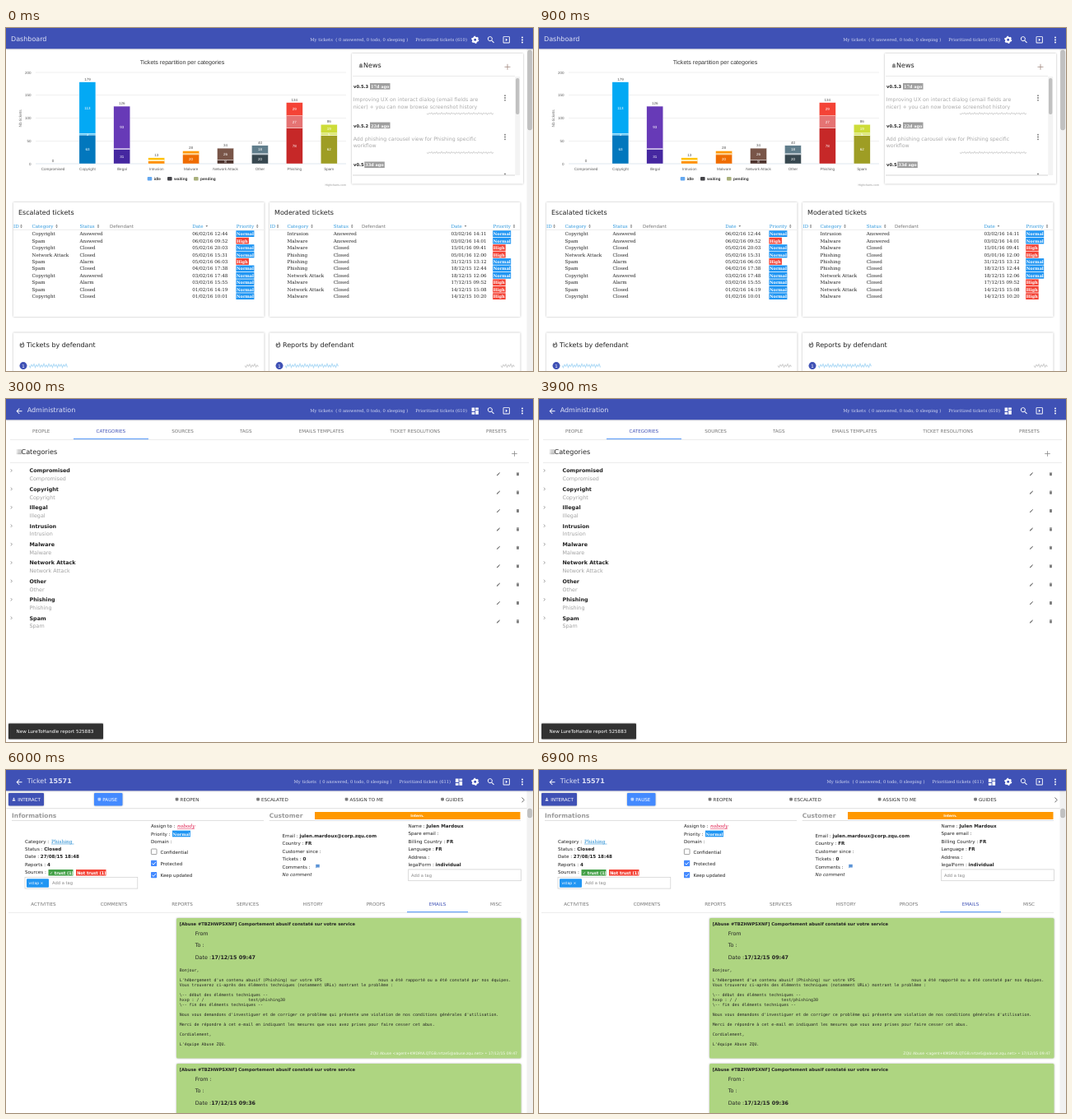
These frames come from a looping animation (640 px wide and 417 px high, 7500 ms). An HTML page:

```html
<!DOCTYPE html>
<html lang="en">
<head>
<meta charset="utf-8">
<title>Ticket console tour</title>
<style>
html, body { margin: 0; height: 100%; overflow: hidden; background: #fff; }
svg { display: block; width: 100%; height: 100%; }
text { font-family: "DejaVu Sans", sans-serif; white-space: pre; text-rendering: geometricPrecision; }
.serif { font-family: "DejaVu Serif", "Noto Serif", serif; }
.arial { font-family: "Liberation Sans", Arial, sans-serif; }
.mono { font-family: "DejaVu Sans Mono", monospace; }
.b { font-weight: bold; }
.i { font-style: italic; }
.mid { text-anchor: middle; }
.end { text-anchor: end; }
.card { filter: drop-shadow(0 .7px .8px rgba(0,0,0,.3)); }
</style>
</head>
<body>
<svg id="stage" viewBox="0 0 640 417"></svg>
<script>
const INDIGO = '#3f51b5', BLUE = '#2196f3', RED = '#f44336', GREY = '#9e9e9e', PALE = '#bdbdbd', INK = '#222', RULE = '#e0e0e0';

// Drawing helpers, each returning SVG markup
const text = (x, y, s, size = 5.6, fill = INK, cls = '') =>
  `<text x="${x}" y="${y}" font-size="${size}" fill="${fill}" class="${cls}">${s}</text>`;
const bold = s => `<tspan class="b">${s}</tspan>`;
const rect = (x, y, w, h, fill, more = '') =>
  `<rect x="${x}" y="${y}" width="${w}" height="${h}" fill="${fill}" ${more}/>`;
const line = (x1, y, x2, c = RULE, w = .6) => rect(x1, y - w / 2, x2 - x1, w, c);
const disc = (x, y, r, fill, more = '') => `<circle cx="${x}" cy="${y}" r="${r}" fill="${fill}" ${more}/>`;
const stroke = (d, c, w = .8) => `<path d="${d}" fill="none" stroke="${c}" stroke-width="${w}"/>`;
const card = (x, y, w, h) => rect(x, y, w, h, '#fff', 'class="card"');
const each = (list, f) => list.map(f).join('');
const plus = (x, y, r, c) => stroke(`M${x - r} ${y}h${2 * r}M${x} ${y - r}v${2 * r}`, c);
const dots = (x, y, gap, r, c) => each([-1, 0, 1], k => disc(x, y + k * gap, r, c));
const down = (x, y, c = '#888', r = 2.6) => `<path d="M${x - r} ${y - r / 2}h${2 * r}l${-r} ${r}z" fill="${c}"/>`;
const sorter = (x, y, c) => `<path d="M${x - 1.3} ${y - .6}h2.6l-1.3-1.7zM${x - 1.3} ${y + .6}h2.6l-1.3 1.7z" fill="${c}"/>`;

const shapes = {
  board: 'M3 13h8V3H3v10zm0 8h8v-6H3v6zm10 0h8V11h-8v10zm0-18v6h8V3h-8z',
  search: 'M15.5 14h-.8l-.3-.3A6.5 6.5 0 1 0 13.7 14.4l.3.3v.8l5 5L20.5 19zm-6 0a4.5 4.5 0 1 1 0-9 4.5 4.5 0 0 1 0 9z',
  play: 'M10 8v8l5-4zM19 3H5a2 2 0 0 0-2 2v14a2 2 0 0 0 2 2h14a2 2 0 0 0 2-2V5a2 2 0 0 0-2-2zm0 16H5V5h14z',
  back: 'M20 11H7.8l5.6-5.6L12 4l-8 8 8 8 1.4-1.4L7.8 13H20z',
  edit: 'M3 17.2V21h3.8L17.8 9.9l-3.7-3.7zM20.7 7a1 1 0 0 0 0-1.4l-2.3-2.3a1 1 0 0 0-1.4 0l-1.9 1.8 3.8 3.8z',
  bin: 'M6 19a2 2 0 0 0 2 2h8a2 2 0 0 0 2-2V7H6zM19 4h-3.5l-1-1h-5l-1 1H5v2h14z',
  renew: 'M12 6v3l4-4-4-4v3a8 8 0 0 0-6.8 12.3l1.5-1.5A6 6 0 0 1 12 6zm6.8 1.7L17.3 9.2A6 6 0 0 1 12 18v-3l-4 4 4 4v-3a8 8 0 0 0 6.8-12.3z',
  flame: 'M13.5 1s2 8-2.7 8.2c-2 0-3.6-1.7-3.6-4C3 10 4 14 4 14a8 8 0 0 0 16 0c0-5-2.600-10-6.500-13zM12 19c-4 0-4-4-1-5.500 2-1 3-2 4-3.500 2 6 0 9-3 9z',
  bell: 'M12 22a2 2 0 0 0 2-2h-4a2 2 0 0 0 2 2zm6-6v-5c0-3-1.600-5.600-4.500-6.300V4a1.500 1.500 0 0 0-3 0v.7C7.600 5.400 6 8 6 11v5l-2 2v1h16v-1z',
  bubble: 'M3 3h18v15H7l-4 4z',
  person: 'M12 12a4 4 0 1 0 0-8 4 4 0 0 0 0 8zm0 2c-3 0-8 1.300-8 4v2h16v-2c0-2.700-5-4-8-4z',
  list: 'M3 5h2v2H3zM3 11h2v2H3zM3 17h2v2H3zM7 5h14v2H7zM7 11h14v2H7zM7 17h14v2H7z'
};
const icon = (name, x, y, size, c) =>
  `<path transform="translate(${x - size / 2} ${y - size / 2}) scale(${size / 24})" fill="${c}" fill-rule="evenodd" d="${shapes[name]}"/>`;
const gear = (x, y) => disc(x, y, 2.6, 'none', 'stroke="#fff" stroke-width="2.1"') +
  disc(x, y, 3.9, 'none', 'stroke="#fff" stroke-width="1.4" stroke-dasharray="2.04 2.04"');
const clock = (x, y) => disc(x, y, 2.4, 'none', 'stroke="#aaa" stroke-width=".7"') + stroke(`M${x} ${y - 1.4}v1.600l1.200.7`, '#aaa', .6);

// Smudge over hidden words
const smudge = (x, y, w, h, c) => {
  let d = `M${x} ${y}`;
  for (let k = 1; k <= w / 1.5; k++) d += `L${x + k * 1.5} ${y + (k % 2 - .5) * h * (.65 + .35 * Math.sin(k * 1.7))}`;
  return stroke(d, c, 1.1);
};
const badge = (x, y, level) => {
  const normal = level == 'Normal';
  return rect(x, y - 5.9, normal ? 22 : 15.5, 7.7, normal ? BLUE : RED) + text(x + .6, y, level, 5, '#fff', 'serif b');
};
const box = (x, y, on) => on
  ? rect(x, y, 7.2, 7.2, '#448aff', 'rx=".8"') + stroke(`M${x + 1.5} ${y + 3.7}l1.500 1.600 3-3.300`, '#fff', .9)
  : rect(x + .4, y + .4, 6.6, 6.6, '#fff', 'rx=".7" stroke="#888" stroke-width=".8"');
const scrollbar = (top, end) => rect(632.5, 25, 7.5, 392, '#f1f1f1') + rect(633.5, top, 5.2, end - top, '#c1c1c1', 'rx="2.500" stroke="#aaa" stroke-width=".4"');

function header(title, { back = true, x = 349.5, total = 610, board = 550, cog = true } = {}) {
  const c = '#d5daf2', word = (dx, s) => text(x + dx, 15.6, s, 5.2, c, 'serif');
  return rect(0, 0, 640, 25.3, INDIGO, 'class="card"') +
    (back ? icon('back', 16, 14.8, 10.5, '#fff') + text(25.7, 15.8, title, 8, '#dfe3f6') : text(6, 15.5, title, 8, '#dfe3f6')) +
    word(0, 'My tickets') + word(31, '( 0 answered, 0 todo, 0 sleeping )') + word(128, 'Prioritized tickets (' + total + ')') +
    (board ? icon('board', board, 14.5, 11, '#fff') : '') + (cog ? gear(569.7, 14.3) : '') +
    icon('search', 589, 14.3, 11, '#fff') + icon('play', 607.7, 14.3, 11, '#fff') + dots(627, 14.5, 3, 1, '#fff');
}

function tabs(list, y, active, from, to) {
  return each(list, ([x, s]) => text(x, y, s, 5.6, s == active ? INDIGO : '#757575', 'mid')) +
    line(from, y + 7.3, to, '#64a0f8', 1.2);
}

function chart() {
  const bars = [
    ['Compromised', 0, []],
    ['Copyright', 179, [[63, '#0277bd', 1], [3, '#4fc3f7', 1], [113, '#03a9f4', 1]]],
    ['Illegal', 126, [[31, '#4527a0', 1], [2, '#9575cd'], [93, '#673ab7', 1]]],
    ['Intrusion', 13, [[6, '#ff8f00'], [2, '#ffe082'], [5, '#ffc107']]],
    ['Malware', 28, [[20, '#ef6c00', 1], [2, '#ffb74d'], [6, '#ff9800']]],
    ['Network Attack', 34, [[8, '#4e342e', 1], [26, '#795548', 1]]],
    ['Other', 40, [[20, '#37474f', 1], [2, '#90a4ae'], [18, '#607d8b', 1]]],
    ['Phishing', 134, [[78, '#c62828', 1], [27, '#e57373', 1], [29, '#f44336', 1]]],
    ['Spam', 86, [[62, '#9e9d24', 1], [5, '#dce775', 1], [19, '#cddc39', 1]]]];
  const unit = .555, base = 165;
  const column = ([name, sum, parts], k) => {
    const x = 57 + 41.9 * k;
    let y = base, out = text(x, 172.8, name, 4.6, '#606060', 'arial mid');
    for (const [n, c, label] of parts) {
      y -= n * unit;
      out += rect(x - 10, y, 20, n * unit, c, 'stroke="#fff" stroke-width=".4"') +
        (label ? text(x, y + n * unit / 2 + 1.6, n, 4.5, '#fff', 'arial mid') : '');
    }
    return out + text(x, y - 2, sum, 4.5, '#555', 'arial mid');
  };
  const key = (x, c, s) => rect(x, 181, 5.6, 4.4, c, 'rx="1"') + text(x + 8, 185.3, s, 4.8, '#333', 'arial b');
  return text(214, 43.8, 'Tickets repartition per categories', 7.1, '#333', 'arial mid') +
    each([0, 50, 100, 150, 200], v => line(36, base - v * unit, 413, v ? RULE : '#c0d0e0', .5) + text(30.5, base + 1.5 - v * unit, v, 4.5, '#606060', 'arial end')) +
    `<g transform="rotate(-90 19 110)">${text(19, 110, 'Nb tickets', 4.8, '#707070', 'arial mid')}</g>` +
    each(bars, column) + key(171.7, '#64a8f0', 'idle') + key(196, '#434348', 'waiting') + key(228, '#a9b07c', 'pending') +
    text(413, 191.7, 'Highcharts.com', 3.7, GREY, 'arial end');
}

function news() {
  const entry = (y, version, bx, age, lines) => text(422, y, version, 5.2, INK, 'b') +
    rect(bx, y - 5.9, 24.5, 7.6, GREY) + text(bx + 1, y, age + 'd ago', 5, '#fff', 'serif b') +
    each(lines, (s, k) => text(421.7, y + 16.400 + 8.3 * k, s, 6.24, '#a9a9a9')) +
    (lines.length ? dots(606, y + 12, 2.8, .9, '#777') + smudge(511, y + 31, 82, 2.2, '#d8d8d8') : '');
  return card(420, 31, 208, 158.500) + icon('bell', 431, 45.8, 7.5, '#8a8a8a') + text(434, 48.3, 'News', 8) + plus(609, 47.3, 3.5, '#a1887f') +
    line(421, 58.5, 618, '#ddd') +
    entry(73, 'v0.5.3', 442, 17, ['Improving UX on interact dialog (email fields are', 'nicer) + you can now browse screenshot history']) +
    entry(120.500, 'v0.5.2', 442, 22, ['Add phishing carousel view for Phishing specific', 'workflow']) +
    entry(168.400, 'v0.5', 435.3, 33, []) + disc(606, 177.5, .9, '#777') +
    line(421, 179, 618, '#bbb') + rect(618.3, 59, 6, 120, '#f3f3f3') + rect(619, 61, 4.400, 44, '#c1c1c1', 'rx="2"');
}

function ticketTable(title, x, [id, cat, status, who, date, prio], rows) {
  const head = (cx, s, w) => text(cx, 243, s, 5.6, '#2b96dc', 'serif') + (s == 'Date' ? down(cx + w, 241, '#555', 1.3) : sorter(cx + w, 241, '#777'));
  return card(x, 212, 304.500, 139) + text(x + 6, 227, title, 8) +
    head(id, 'ID', 9.5) + head(cat, 'Category', 30) + head(status, 'Status', 22.5) + text(who, 243, 'Defendant', 5.5, '#777') +
    head(date, 'Date', 17.5) + head(prio, 'Priority', 25.5) + line(x, 245.2, x + 304) +
    each(rows, ([c, s, d, p], k) => {
      const y = 252.2 + 8.45 * k;
      return text(cat, y, c, 5.6, INK, 'serif') + text(status, y, s, 5.6, INK, 'serif') + text(date, y, d, 5.6, INK, 'serif') + badge(prio - .3, y, p ? 'High' : 'Normal');
    });
}

function dashboard() {
  const escalated = [
    ['Copyright', 'Answered', '06/02/16 12:44'], ['Spam', 'Answered', '06/02/16 09:52', 1], ['Copyright', 'Closed', '05/02/16 20:03'],
    ['Network Attack', 'Closed', '05/02/16 15:31'], ['Spam', 'Alarm', '05/02/16 06:03', 1], ['Spam', 'Closed', '04/02/16 17:38'],
    ['Copyright', 'Answered', '03/02/16 17:48'], ['Spam', 'Alarm', '03/02/16 15:55'], ['Spam', 'Closed', '01/02/16 14:19'], ['Copyright', 'Closed', '01/02/16 10:01']];
  const moderated = [
    ['Intrusion', 'Answered', '03/02/16 14:11'], ['Malware', 'Answered', '03/02/16 14:01'], ['Malware', 'Closed', '15/01/16 09:41', 1],
    ['Phishing', 'Closed', '05/01/16 12:00', 1], ['Phishing', 'Closed', '31/12/15 13:12'], ['Phishing', 'Closed', '18/12/15 12:44'],
    ['Network Attack', 'Closed', '18/12/15 12:06'], ['Malware', 'Closed', '17/12/15 09:52', 1], ['Network Attack', 'Closed', '14/12/15 15:08', 1], ['Malware', 'Closed', '14/12/15 10:20', 1]];
  const ranking = (x, s, w) => card(x, 370.500, 304.500, 60) + icon('flame', x + 10.5, 385, 8.5, '#777') + text(x + 16, 388, s, 8) +
    disc(x + 12, 410.600, 4.5, INDIGO) + text(x + 12, 412.600, 1, 5.4, '#fff', 'mid') +
    smudge(x + 19, 410.500, w, 4.5, '#b3dcf6') + smudge(x + 281, 410.500, 17, 4, '#d0d0d0');
  return chart() + news() +
    ticketTable('Escalated tickets', 9, [9, 31.5, 89.5, 126, 226.3, 279.7], escalated) +
    ticketTable('Moderated tickets', 320, [320.500, 341.5, 397.7, 432, 540.500, 591.5], moderated) +
    ranking(9, 'Tickets by defendant', 47) + ranking(320, 'Reports by defendant', 65) +
    scrollbar(27, 124) + header('Dashboard', { back: false, x: 369.3, board: 0 });
}

function search() {
  const hint = (x, y, s) => text(x, y, s, 6.4, PALE);
  const pick = (x, s) => hint(x, 120, s) + down(x + 79, 118) + line(x, 123.7, x + 81.5);
  const radio = (x, s, on) => disc(x, 65.8, 2.9, '#fff', `stroke="${on ? BLUE : '#777'}" stroke-width=".8"`) + (on ? disc(x, 65.8, 1.6, BLUE) : '') + text(x + 6.8, 67.900, s, 6.4);
  const cols = [[29, 'ID', 10], [56.6, 'Category', 30.500], [237.5, 'Status', 22.500], [313, 'Priority', 26], [355.5, 'Date', 17.500], [422, 'Last Update', 39.500], [485, 'Reports', 27]];
  const rows = [
    ['Malware', 'Answered', 0, '15/07/15 16:49', '100h', 1, '1 comment', '1 item'], ['Other', 'Answered', 1, '21/07/15 18:09', '212h', 1, 'No comment', '1 item'],
    ['Intrusion', 'Answered', 0, '10/08/15 16:44', '100h', 1, 'No comment', '1 item'], ['Copyright', 'Answered', 1, '11/09/15 15:53', '245h', 3, 'No comment', '1 item'],
    ['Spam', 'Alarm', 0, '11/09/15 16:15', '188h', 213, '1 comment', '1452 items'], ['Phishing', 'Alarm', 0, '13/10/15 06:47', '53h', 25, 'No comment', '24 items'],
    ['Copyright', 'Alarm', 0, '21/10/15 14:31', '749h', 1, 'No comment', '1 item'], ['Spam', 'Open', 0, '05/11/15 18:54', '1655h', 18, 'No comment', '18 items']];
  const row = ([cat, status, high, date, ago, reports, notes, items], k) => {
    const y = 208.500 + 27.600 * k, cell = (x, s, cls = 'serif') => text(x, y, s, 5.6, INK, cls);
    const mark = status == 'Answered' ? stroke(`M237.500 ${y - 4}l3.500 3.500M238 ${y - 1.500}v-2.500h2M241.500 ${y - 4}v2`, '#999', .6) : status == 'Open' ? disc(240, y - 2, 2.2, '#888') : '';
    return box(4.8, y - 5.500) + cell(56.600, cat) + mark + cell(mark ? 244.3 : 239.3, status, 'serif b') + badge(313, y, high ? 'High' : 'Normal') +
      cell(355.500, date) + cell(422, ago + ' ago') + cell(485, reports, '') + icon('person', 545, y - 7.5, 4.5, '#aaa') +
      icon('bubble', 545.500, y - 1.700, 4.5, '#777') + text(549.2, y - .2, notes, 4.8) + icon('list', 545.300, y + 3.500, 4.5, '#aaa') + text(548.500, y + 5.2, items, 4.8) + line(2, y + 11.4, 631);
  };
  return hint(4, 44.900, 'Search') + line(3, 48, 588) + text(600.7, 45, 'MORE', 5.9) + radio(283.4, 'Tickets', 1) + radio(320.900, 'Reports') +
    each([[4, 'Ticket or Public ID'], [97.3, 'Defendant'], [191, 'IF / URL'], [284.3, 'Source']], ([x, s]) => hint(x, 88.6, s) + line(x, 93, x + 74)) +
    hint(359.700, 88.900, 'Categories') + down(403.2, 87) + line(359.700, 93, 406) + text(409, 88.8, 'AntihackError, Open, Paused, Answered, Alarm, WaitingAnswer, Reop', 6.36) +
    pick(2.5, 'Ticket tags') + pick(86.500, 'Priorities') + pick(170.500, 'Assign') + pick(254.500, 'Defendant tags') +
    each([[340.7, 'Escalated'], [438.300, 'Moderated'], [536, 'Confidential']], ([x, s]) => box(x, 114.2) + text(x + 11.400, 120.1, s, 6.4)) +
    text(2, 152, '647 tickets found', 5.2, INK, 'i') + disc(618.500, 150.600, 9.6, INDIGO, 'class="card"') + icon('renew', 618.500, 151.500, 10.5, '#fff') +
    box(4.8, 174.3) + each(cols, ([x, s, w]) => text(x, 184.500, s, 5.6, '#666', 'serif') + (s == 'Date' ? down(x + w, 182.500, '#555', 1.3) : sorter(x + w, 182.500, '#777'))) +
    text(105, 184.500, 'Defendant', 5.6, '#666') + text(527.500, 184.500, 'Details', 5.6, '#666') + line(2, 192.300, 631) + each(rows, row) + scrollbar(27, 345) + header('Search');
}

function admin() {
  const names = ['Compromised', 'Copyright', 'Illegal', 'Intrusion', 'Malware', 'Network Attack', 'Other', 'Phishing', 'Spam'];
  return line(5, 49.5, 635) +
    tabs([[42.7, 'PEOPLE'], [127.3, 'CATEGORIES'], [214.600, 'SOURCES'], [291.200, 'TAGS'], [383, 'EMAILS TEMPLATES'], [496.600, 'TICKET RESOLUTIONS'], [595.500, 'PRESETS']], 41.2, 'CATEGORIES', 82, 173) +
    icon('list', 16, 64.300, 8.5, '#777') + text(18.500, 66.900, 'Categories', 8.1) + plus(617.500, 66.500, 3.3, '#888') + line(5, 77.500, 635) +
    each(names, (s, k) => {
      const y = 89.300 + 22.4 * k;
      return stroke(`M5.800 ${y - 4}l1.500 1.700-1.500 1.700`, '#777', .7) + text(28.500, y, s, 6.4, INK, 'b') + text(28.500, y + 9.9, s, 6.4, '#a0a0a0') +
        icon('edit', 598, y + 1.900, 5.5, '#777') + icon('bin', 621.500, y + 1.900, 5.5, '#777');
    }) +
    rect(3, 394.500, 115, 19, '#323232', 'rx=".8" class="card"') + text(12.500, 406.200, 'New LureToHandle report 525883', 5.6, '#fff') +
    header('Administration', { x: 369.3, board: 569.7, cog: false });
}

function ticket(mail) {
  const field = (x, y, name, value = '') => text(x, y, `${name} : ${bold(value)}`);
  const tagBox = (x, y) => rect(x, y, 136.800, 13.800, '#fff', 'stroke="#ccc" stroke-width=".7"');
  const action = (x, s, c = '#333') => rect(x - 5.8, 33.700, 3.700, 3.700, c, 'rx=".8" opacity=".65"') + text(x, 37.600, s, 5.6, c);
  const check = (y, s, on) => box(176, y - 5.900, on) + text(187.500, y, s);
  return rect(0, 25, 640, 21, '#fff', 'class="card"') + rect(3, 28, 43, 15.500, INDIGO, 'rx="1" class="card"') + rect(107, 28, 34.500, 15.500, '#448aff', 'rx="1" class="card"') +
    icon('person', 9.5, 35.600, 5.5, '#fff') + text(14.300, 37.600, 'INTERACT', 5.6, '#fff') + action(117.300, 'PAUSE', '#fff') +
    action(211.500, 'REOPEN') + action(310, 'ESCALATED') + action(417.500, 'ASSIGN TO ME') + action(534, 'GUIDES') + stroke('M626.500 33.500l2.700 2.900-2.700 2.900', '#555', .9) +
    text(7, 58.300, 'Informations', 7.5, '#999', 'b') + line(7, 61.300, 313, '#ccc') + text(319.700, 58.300, 'Customer', 7.5, '#999', 'b') + line(319.700, 61.300, 625, '#ccc') +
    rect(375, 51, 249.500, 9, '#ff9800') + text(499.500, 57.200, 'Intern.', 4.3, '#fff', 'b mid') +
    (mail ? '' : field(23, 70, 'Publicid') + field(23, 79.300, 'otrsId')) +
    field(23, 88.700, 'Category') + text(55, 88.700, 'Phishing', 5.8, '#1e88d0', 'serif') + stroke('M55 90h27.500', '#1e88d0', .5) +
    field(23, 98, 'Status', 'Closed') + field(23, 107.300, 'Date', '27/08/15 18:48') + field(23, 116.700, 'Reports', '4') + field(23, 126.300, 'Sources') +
    rect(51.500, 121, 30, 7.5, '#43a047') + text(53, 126.700, '✓ trust (1)', 4.9, '#fff', 'b') + rect(85, 121, 36.500, 7.5, RED) + text(86.200, 126.700, 'Not trust (1)', 5, '#fff', 'b') +
    tagBox(23, 130.300) + rect(25, 132.200, 27, 10.500, BLUE, 'rx="1"') + text(27.500, 139.200, 'vstap ×', 4.6, '#fff') + text(56, 139.300, 'Add a tag', 5.2, '#888') +
    field(176, 70, 'Assign to') + text(208, 70, 'nobody', 5.8, '#d14', 'serif i') + stroke('M208 71.400h21', '#d14', .5) +
    field(176, 79.500, 'Priority') + badge(202, 79.500, 'Normal') + field(176, 89, 'Domain') +
    check(101.500, 'Confidential') + check(115.700, 'Protected', 1) + check(129.900, 'Keep updated', 1) +
    field(335.500, 82, 'Email', 'julen.mardoux@corp.zqu.com') + field(335.500, 91.300, 'Country', 'FR') + field(335.500, 100.700, 'Customer since') +
    (mail ? '' : smudge(385, 98.500, 32, 5, PALE)) + field(335.500, 110, 'Tickets', '0') + field(335.500, 119.500, 'Comments') + icon('bubble', 378.500, 117, 6, '#5b93d6') +
    text(335.500, 129.400, 'No comment', 5.6, INK, 'i') +
    field(488.500, 70, 'Name', 'Julen Mardoux') + field(488.500, 79.300, 'Spare email') + field(488.500, 88.700, 'Billing Country', 'FR') + field(488.500, 98, 'Language', 'FR') +
    field(488.500, 107.500, 'Address') + field(488.500, 117, 'legalForm', 'individual') + tagBox(488.700, 120.900) + text(492, 129.700, 'Add a tag', 5.2, '#888') +
    line(3, 173.300, 625) +
    tabs([[45.500, 'ACTIVITIES'], [131, 'COMMENTS'], [214, 'REPORTS'], [293.500, 'SERVICES'], [372.500, 'HISTORY'], [449, 'PROOFS'], [524, 'EMAILS'], [595, 'MISC']], 165.300,
      mail ? 'EMAILS' : 'ACTIVITIES', mail ? 487 : 3, mail ? 561 : 88) +
    (mail ? emails() : activities()) + scrollbar(47, mail ? 58 : 88) + header('Ticket ' + bold('15571'), { total: 611 });
}

function activities() {
  const me = 'julen.mardoux', bot = 'clean.agent', closed = 'change status from Alarm to Closed, reason : invalid', sent = 'send an email to';
  const log = [
    [me, 'add comment', '21/12/15 15:28'], [bot, 'change treatedBy from ' + me + ' to nobody', '18/12/15 14:22'], [me, closed, '17/12/15 12:55'],
    [bot, 'change status from WaitingAnswer to Alarm', '17/12/15 11:48'], [me, 'change status from WaitingAnswer to WaitingAnswer (for 1 hour(s))', '17/12/15 10:47'],
    [me, sent, '17/12/15 10:47'], [me, 'change status from Closed to WaitingAnswer (for 1 hour(s))', '17/12/15 10:36'],
    [me, sent + ' :', '17/12/15 10:36'], [me, sent, '17/12/15 10:36'], [me, sent, '17/12/15 10:36'], [me, closed, '25/11/15 12:13']];
  return icon('search', 9.700, 181.300, 13, '#777') + text(20, 182.300, 'Filter', 6.4, GREY) + line(19.500, 186.500, 626) +
    each(log, ([who, what, when], k) => {
      const y = 211.900 + 20.8 * k;
      return (k ? clock(13.500, y - 2.500) : icon('bubble', 13.300, y - 2.500, 7, '#888')) +
        text(33, y, `<tspan class="i">${who}</tspan> : ${bold(what)}`, 6.4) + text(622, y, when, 6.3, INK, 'end') + line(3, y + 8.4, 622);
    });
}

function emails() {
  const body = [
    [0, 'Bonjour,'], [2, "L'hébergement d'un contenu abusif (Phishing) sur votre VPS" + ' '.repeat(23) + 'nous a été rapporté ou a été constaté par nos équipes.'],
    [3, 'Vous trouverez ci-après des éléments techniques (notamment URLs) montrant le problème :'],
    [5, '\\-- début des éléments techniques --'], [6, 'hxxp : / /' + ' '.repeat(18) + 'test/phishing30'], [7, '\\-- fin des éléments techniques --'],
    [9, "Nous vous demandons d'investiguer et de corriger ce problème qui présente une violation de nos conditions générales d'utilisation."],
    [11, 'Merci de répondre à cet e-mail en indiquant les mesures que vous avez prises pour faire cesser cet abus.'],
    [13, 'Cordialement,'], [15, "L'équipe Abuse ZQU."]];
  const head = (y, h, from, time) => rect(207, y, 418.500, h, '#aed581', 'rx="1.500" class="card"') +
    text(210.700, y + 9.200, '[Abuse #TBZHWPSXNF] Comportement abusif constaté sur votre service', 5.2, INK, 'b') +
    text(229.700, y + 20.900, from, 6.4) + text(229.700, y + 35.400, 'To :', 6.4) + text(229.700, y + 49.800, 'Date :' + bold('17/12/15 ' + time), 6.4);
  return head(180, 170.500, 'From', '09:47') + each(body, ([n, s]) => text(210.700, 244.600 + 6 * n, s, 4.97, INK, 'mono')) +
    text(621, 345.700, 'ZQU Abuse &lt;agent+KMDRVLQTGB.nrtze5@abuse.zqu.net&gt; • 17/12/15 09:47', 4.6, '#f4faea', 'end') +
    head(357, 70, 'From :', '09:36');
}

const stage = document.getElementById('stage');
stage.innerHTML = each([dashboard(), search(), admin(), ticket(false), ticket(true)], s => `<g>${s}</g>`);
const scenes = [...stage.children], hold = 1500;

function draw() {
  const now = Math.floor(performance.now() / hold) % scenes.length;
  scenes.forEach((g, k) => g.style.display = k == now ? '' : 'none');
  requestAnimationFrame(draw);
}
draw();
</script>
</body>
</html>
```
